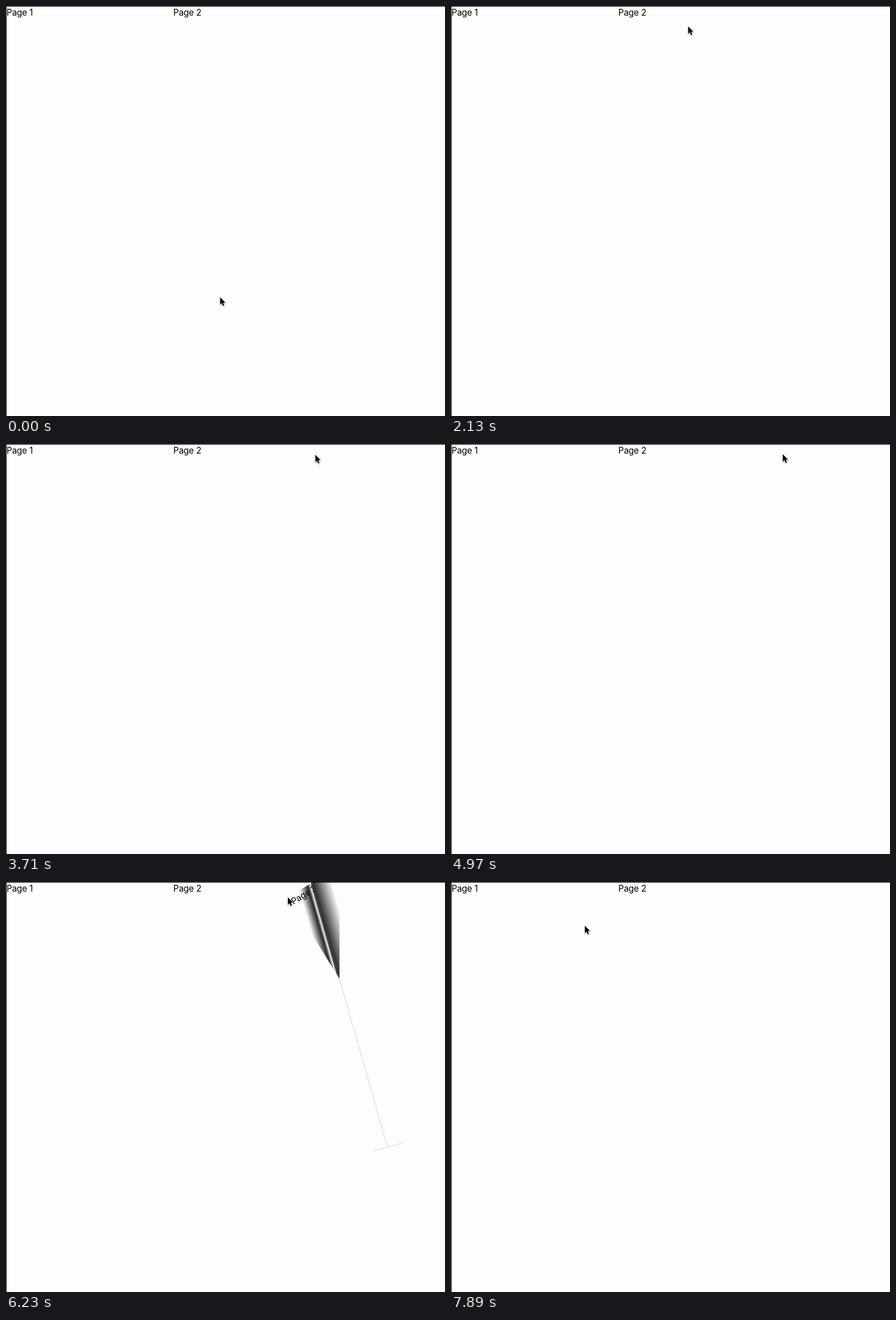
Write an HTML page that moves like this. It is 774x723 px and loops after 8000 ms.

```html
<!DOCTYPE html>
<html lang="en">
<head>
<meta charset="utf-8">
<title>Page corner fold</title>
<style>
html, body { margin: 0; width: 100%; height: 100%; overflow: hidden; background: #fdfdfd; }
svg { display: block; }
text { font: 15.4px Inter, "Open Sans", sans-serif; letter-spacing: -.2px; fill: #000; }
#cursor { filter: drop-shadow(0 1px 1px rgba(0, 0, 0, .35)); }
</style>
</head>
<body>
<svg width="774" height="723" viewBox="0 0 774 723">
  <defs>
    <linearGradient id="outerShade" gradientUnits="userSpaceOnUse">
      <stop offset="0"/>
      <stop offset="1" stop-opacity="0"/>
    </linearGradient>
    <linearGradient id="innerShade" gradientUnits="userSpaceOnUse">
      <stop offset=".05"/>
      <stop offset=".15" stop-opacity=".05"/>
      <stop offset=".35"/>
      <stop offset="1" stop-opacity="0"/>
    </linearGradient>
    <clipPath id="flapClip"><polygon id="flapShape"/></clipPath>
  </defs>
  <rect width="774" height="723" fill="#fdfdfd"/>
  <text x="1" y="17">Page 1</text>
  <text x="295" y="17">Page 2</text>
  <g id="fold">
    <polygon id="under" fill="#fdfdfd"/>
    <polygon id="outer" fill="url(#outerShade)"/>
    <polygon id="flap" fill="#fdfdfd"/>
    <g clip-path="url(#flapClip)"><text id="backText" y="16">Page 3</text></g>
    <polygon id="inner" fill="url(#innerShade)"/>
    <path id="seam" fill="none" stroke="#555" stroke-width=".7" stroke-dasharray="1.5 2.5"/>
  </g>
  <path d="M0 .5H774M.5 0V723" fill="none" stroke="#000"/>
  <path id="cursor" d="M0 0V13L3 10.4L5 15.2L7.2 14.3L5.2 9.6H9.2Z"
        stroke="#fff" stroke-width="1.6" stroke-linejoin="round" paint-order="stroke"/>
</svg>
<script>
const LOOP = 8000, PAGE = 294, STROKE = 760;
const CORNER = { x: 588, y: 1 };
const GRAB = 5470, HELD = 6230, RELEASE = 6325, BACK = 95;

// Places the pointer reaches: time, position, and length of the move there
const home = { x: 378, y: 514 };
const moves = [
  { at: 490, x: 177, y: 292, over: 490 },
  { at: 1710, x: 410, y: 67 },
  { at: 2130, x: 418, y: 36, over: 420 },
  { at: 2450, x: 469, y: 18, over: 320 },
  { at: 3290, x: 516, y: 19 },
  { at: 4110, x: 578, y: 19 },
  { at: 4970, x: 585, y: 18, over: 80 },
  { at: HELD, x: 497, y: 27 },
  { at: 6770, x: 446, y: 35, over: 480 },
  { at: 7070, x: 362, y: 52, over: 300 },
  { at: 7890, x: 236, y: 77 }
];

const el = id => document.getElementById(id);
const clamp = k => Math.min(1, Math.max(0, k));
const mix = (a, b, k) => ({ x: a.x + (b.x - a.x) * k, y: a.y + (b.y - a.y) * k });
const along = (p, d, n) => ({ x: p.x + d.x * n, y: p.y + d.y * n });
const poly = (...pts) => pts.map(p => p.x + "," + p.y).join(" ");
const set = (id, attrs) => {
  for (const name in attrs) el(id).setAttribute(name, attrs[name]);
};

function pointer(t) {
  return moves.reduce((p, m) => {
    const over = m.over || STROKE;
    return mix(p, m, clamp((t - m.at + over) / over));
  }, home);
}

// Where the dragged corner lies, or null when the page is flat
function cornerAt(t) {
  if (t <= GRAB || t >= RELEASE + BACK) return null;
  const p = pointer(Math.min(t, HELD));
  return mix({ x: p.x + 1.5, y: p.y - .5 }, CORNER, clamp((t - RELEASE) / BACK));
}

function drawFold(p) {
  el("fold").style.display = p ? "" : "none";
  if (!p) return;
  // The crease is the perpendicular bisector of the corner's displacement
  const dx = CORNER.x - p.x, dy = p.y - CORNER.y, dist = Math.hypot(dx, dy);
  const top = { x: CORNER.x - dist * dist / (2 * dx), y: CORNER.y };
  const side = { x: CORNER.x, y: CORNER.y + dist * dist / (2 * dy) };
  const normal = { x: dx / dist, y: -dy / dist };
  const dir = { x: dy / dist, y: dx / dist };
  const mid = mix(p, CORNER, .5);

  const progress = dx / (2 * PAGE), opacity = 1 - progress;
  const width = PAGE * .75 * progress;
  const shade = (id, w) => {
    const end = along(mid, normal, w);
    set(id, { x1: mid.x, y1: mid.y, x2: end.x, y2: end.y });
  };
  shade("outerShade", width);
  shade("innerShade", -width * .75);

  const lifted = poly(top, side, CORNER), flap = poly(top, side, p);
  set("under", { points: lifted });
  set("outer", { points: lifted, opacity });
  set("flap", { points: flap });
  set("flapShape", { points: flap });
  set("inner", { points: flap, opacity });

  const angle = Math.atan2(top.y - p.y, top.x - p.x) * 180 / Math.PI;
  set("backText", { transform: `translate(${p.x} ${p.y}) rotate(${angle})` });

  const foot = along(top, dir, PAGE * 1.65);
  const left = along(foot, normal, -width * .7), right = along(foot, normal, width * .8);
  set("seam", { d: `M${poly(side)}L${poly(foot)}M${poly(left)}L${poly(right)}` });
}

function draw(t) {
  const c = pointer(t);
  set("cursor", { transform: `translate(${c.x} ${c.y})` });
  drawFold(cornerAt(t));
}

const start = performance.now();
function tick() {
  draw((performance.now() - start) % LOOP);
  requestAnimationFrame(tick);
}
tick();
</script>
</body>
</html>
```
